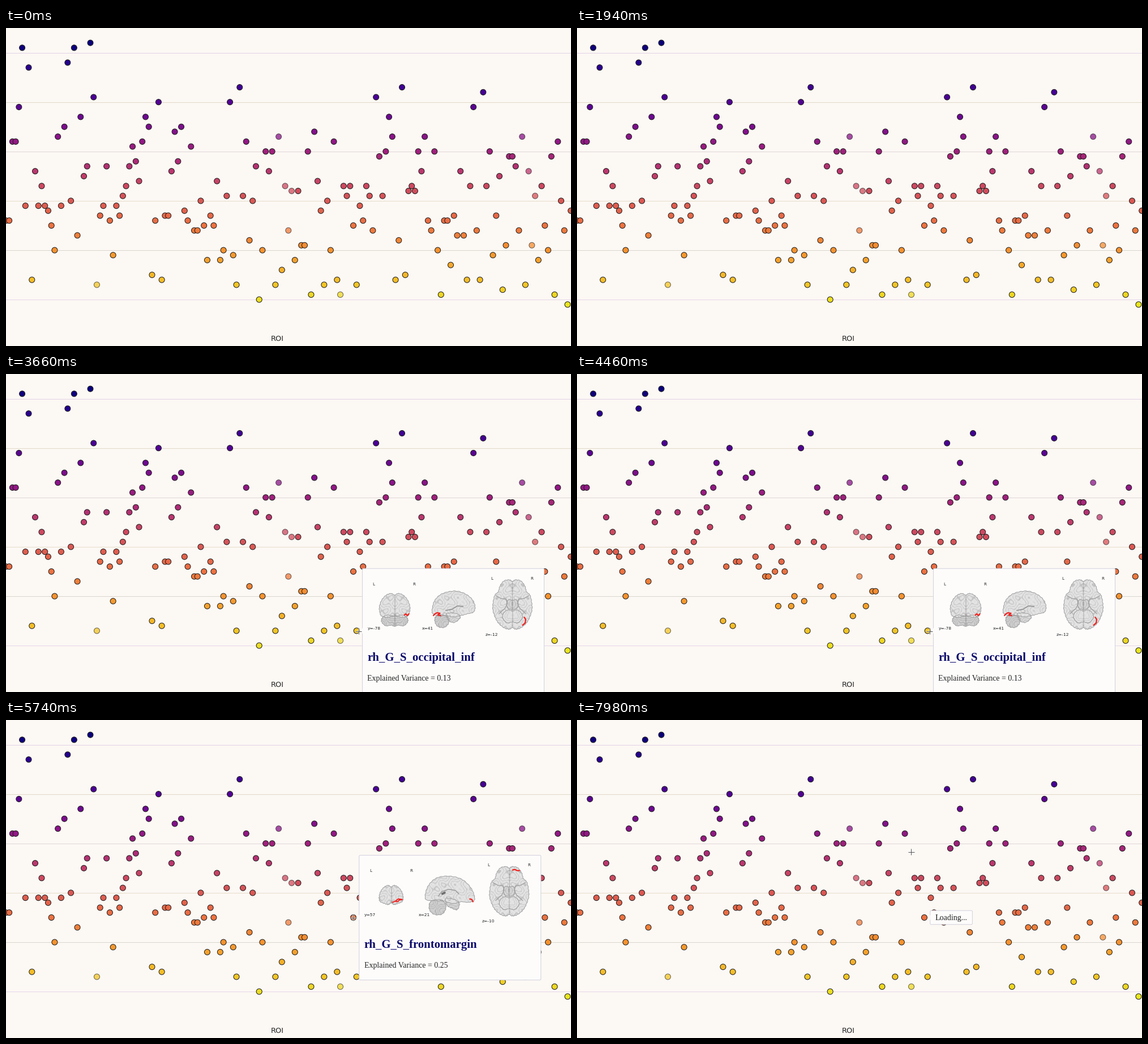
A matplotlib script that plays this animation: 998x561 px, repeating every 8000 ms.

```python
import numpy as np
import matplotlib.pyplot as plt
from matplotlib.animation import FuncAnimation
from matplotlib.colors import LinearSegmentedColormap, to_rgba
from matplotlib.patches import FancyBboxPatch, Polygon

W, H, DPI = 998, 561, 100
PX = 72 / DPI          # points per pixel
STEP, LOOP = 40, 8000  # ms

BG, CARD, BORDER = "#fcf8f4", "#fdfcfb", "#d3d1dd"
NAVY, INK, RED = "#08066a", "#222222", "#f0201c"

# Explained variance in percent, one value per region along the x axis.
LEFT = [
    26, 26, 42, 42, 49, 61, 29, 57, 14, 36, 29, 33, 29, 28, 25, 20,
    43, 29, 45, 58, 30, 61, 23, 47, 35, 37, 62, 51, 13, 27, 29, 37,
    26, 19, 29, 27, 31, 33, 37, 41, 38, 34, 42, 47, 45, 15, 26, 50,
    14, 27, 27, 36, 44, 38, 45, 28, 26, 41, 24, 24, 30, 25, 18, 27,
    25, 34, 18, 20, 31, 50, 19, 13, 53, 31, 42, 22, 30, 37, 10, 20,
    40, 36, 40, 13, 43, 16, 33, 24, 32, 18, 32, 21, 21, 40, 11, 44,
    34, 28, 13, 30, 20, 42]
RIGHT = [
    14, 11, 33, 31, 33, 25, 13, 29, 26, 33, 31, 24, 51, 39, 31, 40,
    47, 43, 14, 22, 53, 15, 32, 33, 32, 40, 36, 43, 26, 24, 40, 20,
    11, 26, 26, 17, 27, 23, 36, 23, 14, 33, 49, 24, 14, 52, 33, 40,
    19, 27, 35, 12, 21, 39, 39, 37, 24, 43, 13, 36, 21, 31, 18, 33,
    25, 20, 39, 11, 42, 30, 24, 9, 28, 17]
VALUES = np.array(LEFT + RIGHT)
FADED = [28, 84, 86, 87, 88, 103, 159, 161, 162, 163]

STOPS = [(9, "#e9e51f"), (14, "#f5bd27"), (20, "#f6922e"), (25, "#ec7240"),
         (30, "#db5853"), (34, "#c84365"), (37, "#b43172"), (40, "#9f207c"),
         (43, "#8b1488"), (47, "#6d0891"), (51, "#4b0095"), (57, "#2a008f"),
         (62, "#0a007a")]
CMAP = LinearSegmentedColormap.from_list(
    "roi", [((v - 9) / 53, c) for v, c in STOPS])


def px(k):
    return -0.1 + 5.7345 * k


def py(v):
    return 479.1 - 8.71 * (v - 10)


fig = plt.figure(figsize=(W / DPI, H / DPI), dpi=DPI, facecolor=BG)
ax = fig.add_axes([0, 0, 1, 1])
ax.set_xlim(0, W)
ax.set_ylim(H, 0)
ax.axis("off")

# ---------- scatter plot ----------
GRID = ["#e2d4e6", "#e0d8c8", "#e0d6da", "#e4dcc8", "#d9d5cd", "#e6d6ec"]
for v, color in zip(range(60, 0, -10), GRID):
    ax.axhline(py(v), color=color, lw=PX, zorder=1)

index = np.arange(len(VALUES))
face = CMAP((VALUES - 9) / 53)
edge = np.tile(to_rgba("#1c1a1a"), (len(VALUES), 1))
face[FADED, 3] = 0.75
edge[FADED, 3] = 0.65
ax.scatter(px(index), py(VALUES), s=(10 * PX) ** 2, c=face,
           edgecolors=edge, linewidths=PX, zorder=2)


def label(x, y, s, size, font="DejaVu Sans", color=INK, **kw):
    return ax.text(x, y, s, fontsize=size * PX, family=font, color=color,
                   va="baseline", zorder=kw.pop("zorder", 8), **kw)


label(478.8, 552, "ROI", 13, ha="center")


# ---------- brain slices ----------
def smooth(pts, n=10, ripple=0.45):
    """Closed Catmull-Rom curve with a slightly folded rim."""
    p = np.array(pts, float)
    a, b, c, d = (np.roll(p, s, 0)[:, None] for s in (1, 0, -1, -2))
    t = np.linspace(0, 1, n, endpoint=False)[None, :, None]
    curve = 0.5 * (2 * b + (c - a) * t + (2 * a - 5 * b + 4 * c - d) * t**2
                   + (3 * b - a - 3 * c + d) * t**3)
    curve = curve.reshape(-1, 2)
    mid = curve.mean(0)
    out = curve - mid
    out /= np.hypot(*out.T)[:, None] + 1e-6
    return curve + out * ripple * np.sin(np.arange(len(curve)) * 1.25)[:, None]


def mirror(cx, half):
    """Full outline from its right half, listed top to bottom."""
    right = [(cx + x, y) for x, y in half]
    return right + [(cx - x, y) for x, y in half[::-1] if x > 0]


def folds(x, y, pitch):
    """Grey level of a folded cortex."""
    phase = pitch * (0.8 * x + 0.5 * y) + 2.1 * np.sin(0.27 * y + 0.6) \
        + 1.7 * np.sin(0.31 * x - 0.12 * y)
    line = np.exp(-(np.sin(phase) / 0.32) ** 2)
    return 0.885 - 0.14 * line + 0.02 * np.sin(0.9 * x) * np.cos(0.8 * y)


def lobe(ox, oy, pts, cx=None, pitch=0.33, dim=0.0):
    outline = smooth(pts)
    lo, hi = outline.min(0) - 1, outline.max(0) + 1
    gx, gy = np.meshgrid(np.linspace(lo[0], hi[0], 180),
                         np.linspace(lo[1], hi[1], 180))
    u = gx if cx is None else np.abs(gx - cx)
    grey = folds(u, gy, pitch) - dim
    if cx is not None:
        grey = grey - 0.18 * np.exp(-(u / 0.8) ** 2)
    shape = Polygon(outline + (ox, oy), closed=True, fc="none",
                    ec="#979797", lw=0.9 * PX, zorder=7)
    ax.add_patch(shape)
    im = ax.imshow(np.clip(grey, 0, 1), cmap="gray", vmin=0, vmax=1,
                   extent=(lo[0] + ox, hi[0] + ox, hi[1] + oy, lo[1] + oy),
                   aspect="auto", zorder=6.5)
    im.set_clip_path(shape)
    return [im, shape]


def stroke(ox, oy, pts, color=RED, width=2.2, z=7.5):
    x, y = np.array(pts, float).T
    return ax.plot(x + ox, y + oy, color=color, lw=width * PX, zorder=z,
                   solid_capstyle="round", solid_joinstyle="round")


def axial(ox, oy):
    cx = 265
    parts = lobe(ox, oy, mirror(cx, [
        (0, 23), (5, 20), (15, 22), (22, 31), (25, 41), (31, 47), (34, 60),
        (34.5, 73), (30, 87), (24, 97), (14, 105), (5, 107), (0, 104)]), cx)
    parts += lobe(ox, oy, mirror(cx, [
        (0, 56), (7, 55), (10, 62), (8, 70), (0, 72)]), cx, 0.2, 0.05)
    parts += lobe(ox, oy, mirror(cx, [
        (0, 75), (8, 73), (16, 79), (17, 88), (9, 96), (0, 94)]), cx, 0.5)
    for s in (-1, 1):
        arc = [(cx + s * dx, y) for dx, y in
               [(29, 48), (20, 53), (11, 54), (9, 62), (13, 70), (24, 80)]]
        parts += stroke(ox, oy, arc, "#9a9a9a", 1.2, 7.2)
    return parts


def occipital(ox, oy):
    parts = lobe(ox, oy, mirror(57, [
        (0, 84), (14, 82), (22, 87), (23, 94), (16, 101), (6, 100),
        (0, 102)]), 57, 0.55, 0.08)
    parts += lobe(ox, oy, mirror(57, [
        (0, 47), (6, 44), (15, 47), (23, 56), (27, 68), (26, 78), (23, 84),
        (13, 86), (0, 84)]), 57)
    parts += lobe(ox, oy, [(148, 80), (165, 79), (173, 86), (163, 95),
                           (153, 92)], dim=0.04)
    parts += lobe(ox, oy, [(130, 84), (142, 82), (152, 87), (152, 97),
                           (144, 104), (133, 102), (128, 93)],
                  pitch=0.6, dim=0.08)
    parts += lobe(ox, oy, [
        (124, 79), (124, 68), (128, 56), (138, 46), (152, 41), (168, 40),
        (184, 46), (195, 56), (199, 68), (196, 77), (185, 80), (174, 83),
        (160, 85), (148, 83), (136, 84)])
    parts += stroke(ox, oy, [(147, 74), (158, 72), (168, 66), (178, 67)],
                    "#8f8f8f", 1.6, 7.2)
    parts += axial(ox, oy)
    parts += stroke(ox, oy, [(74, 82), (77, 80), (79, 83), (82, 80)])
    parts += stroke(ox, oy, [(125.5, 83), (128, 80), (132, 78), (137, 79),
                             (133, 82), (138, 83)])
    parts += stroke(ox, oy, [(286, 86), (288.5, 90), (287.5, 96), (283, 100)])
    return parts


def frontal(ox, oy):
    parts = lobe(ox, oy, mirror(56.5, [
        (0, 56), (5, 53), (12, 56), (18, 63), (21, 72), (20, 81), (12, 85),
        (5, 87), (0, 84)]), 56.5)
    parts += lobe(ox, oy, [(153, 76), (168, 78), (177, 85), (173, 96),
                           (163, 93), (155, 88)], pitch=0.2, dim=0.06)
    parts += lobe(ox, oy, [(126, 82), (140, 78), (151, 83), (153, 94),
                           (146, 104), (132, 104), (124, 95)],
                  pitch=0.6, dim=0.08)
    parts += lobe(ox, oy, [
        (118, 78), (118, 64), (124, 51), (135, 41), (150, 37), (168, 38),
        (184, 44), (197, 57), (203, 70), (203, 80), (192, 83), (180, 82),
        (166, 85), (150, 81), (135, 80)])
    parts += stroke(ox, oy, [(140, 72), (146, 64), (158, 60), (170, 62),
                             (176, 68)], "#9c9c9c", 1.6, 7.2)
    parts += stroke(ox, oy, [(147, 68), (151, 66)], "#707070", 4, 7.2)
    parts += axial(ox, oy)
    parts += stroke(ox, oy, [(59, 83), (64, 81), (68, 82), (71, 79),
                             (76, 78), (69, 77), (65, 80)], width=1.9)
    parts += stroke(ox, oy, [(195.5, 77), (199, 78), (201, 82)])
    parts += stroke(ox, oy, [(271, 26), (275, 25), (279, 27), (283, 27)])
    return parts


# ---------- tooltips ----------
def box(x, y, w, h, tip_y):
    frame = FancyBboxPatch((x, y), w, h, boxstyle="round,pad=0,rounding_size=2",
                           fc=CARD, ec=BORDER, lw=PX, zorder=6)
    tip = Polygon([(x + 0.6, tip_y - 5), (x - 4, tip_y), (x + 0.6, tip_y + 5)],
                  fc=CARD, ec="none", zorder=6.1)
    ax.add_patch(frame)
    ax.add_patch(tip)
    return [frame, tip]


def loading(k):
    x, y = px(k) + 10.3, py(VALUES[k])
    return box(x, y - 12.3, 74.6, 24.6, y) + [
        label(x + 8.8, y + 4.6, "Loading...", 14, "Liberation Serif")]


def card(k, title, cuts, draw):
    x, y = px(k) + 10.3, py(VALUES[k])
    top = y - 109.8
    parts = box(x, top, 321, 220, y)
    parts += draw(x, top)
    for dx, dy, s in [(20, 29.5, "L"), (91.5, 29.5, "R"),
                      (228.5, 19.5, "L"), (299.5, 19.5, "R")]:
        parts.append(label(x + dx, top + dy, s, 7.3, ha="center"))
    for dx, dy, s in zip((8.8, 104.8, 216.8), (107.5, 107.5, 118.5), cuts):
        parts.append(label(x + dx, top + dy, s, 7.5))
    parts.append(label(x + 8.8, top + 163.3, title, 20.8, "Liberation Serif",
                       NAVY, weight="bold"))
    parts.append(label(x + 8.8, top + 198,
                       f"Explained Variance = {VALUES[k] / 100:.2f}",
                       13.9, "Liberation Serif"))
    return parts


VIEWS = {
    "load_a": loading(108),
    "card_a": card(108, "rh_G_S_occipital_inf", ("y=-78", "x=41", "z=-12"),
                   occipital),
    "load_b": loading(107),
    "card_b": card(107, "rh_G_S_frontomargin", ("y=57", "x=21", "z=-10"),
                   frontal),
}
SCHEDULE = [(0, None), (3120, "load_a"), (3400, "card_a"), (4800, "load_a"),
            (5120, "load_b"), (5360, "card_b"), (7720, "load_b")]

# ---------- crosshair cursor ----------
KEY_T = [2700, 3160, 4760, 5040, 5120, 7680, 7960]
KEY_X = [650, 623, 623, 612.5, 613.5, 613.5, 590.5]
KEY_Y = [575, 453.5, 453.5, 360.5, 348.5, 348.5, 232.5]
cursor = [ax.plot([], [], color=c, lw=w * PX, zorder=10,
                  solid_capstyle="butt")[0]
          for c, w in [("#ffffffb0", 2.6), ("#555555", 1)]]


def update(i):
    t = i * STEP
    active = [name for start, name in SCHEDULE if start <= t][-1]
    for name, parts in VIEWS.items():
        for part in parts:
            part.set_visible(name == active)
    x, y = np.interp(t, KEY_T, KEY_X), np.interp(t, KEY_T, KEY_Y)
    for line in cursor:
        line.set_visible(t >= KEY_T[0])
        line.set_data([x - 5.5, x + 5.5, np.nan, x, x],
                      [y, y, np.nan, y - 5.5, y + 5.5])
    return cursor


anim = FuncAnimation(fig, update, frames=LOOP // STEP, interval=STEP,
                     init_func=lambda: update(0), repeat=True, repeat_delay=0)
plt.show()
```
